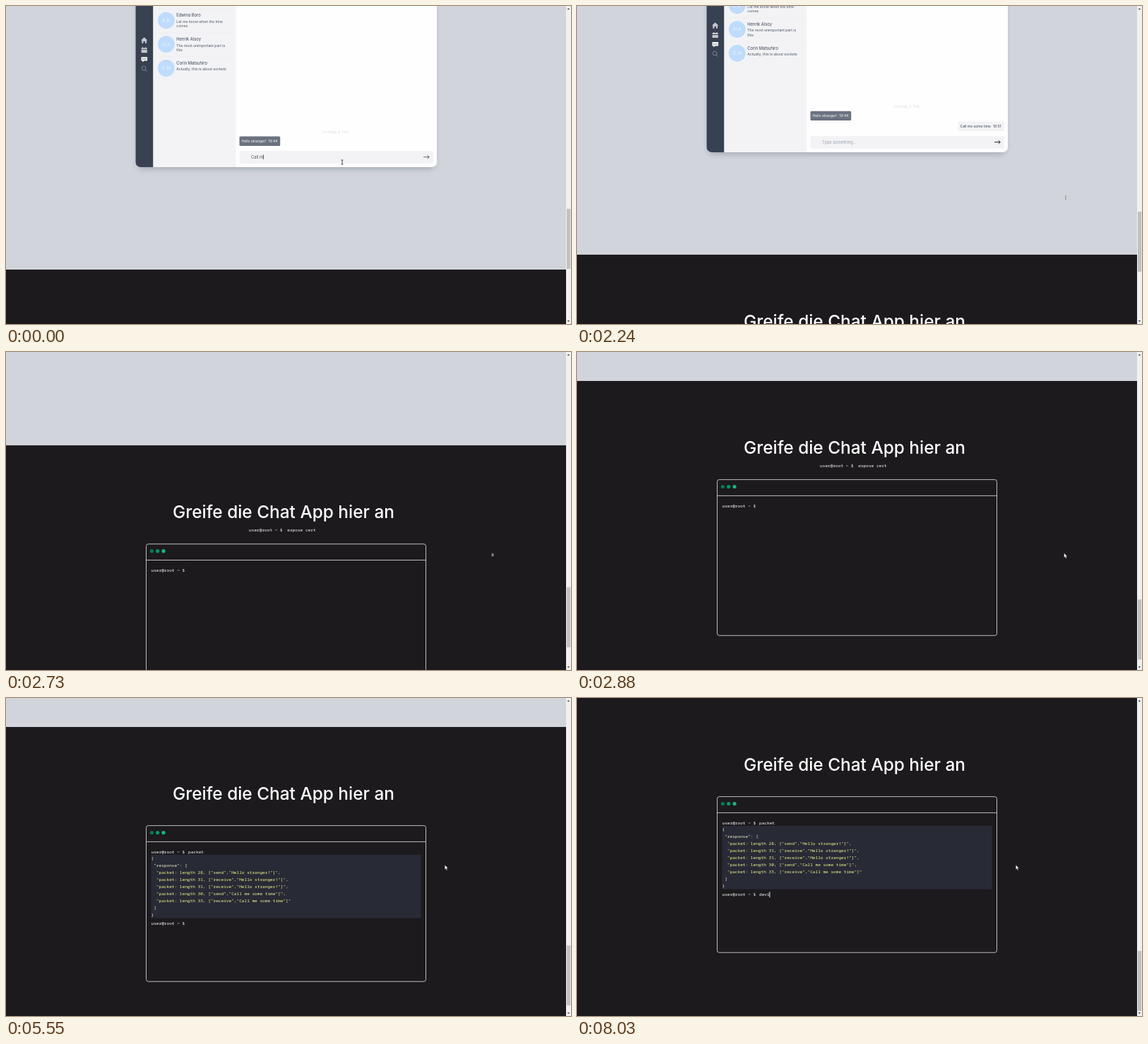
An HTML page that plays this animation: 800x450 px, repeating every 8.09 s.

```html
<!DOCTYPE html>
<html lang="de">
<head>
<meta charset="utf-8">
<title>Chat App</title>
<style>
  html, body { margin: 0; width: 100%; height: 100%; overflow: hidden; background: #d1d5db; }
  svg { display: block; width: 100vw; height: 100vh; }
  text { font-family: Inter, sans-serif; white-space: pre; }
  .mono { font: 500 6.11px "Noto Sans Mono", monospace; fill: #fff; }
</style>
</head>
<body>
<svg id="stage" viewBox="0 0 800 450">
  <defs>
    <filter id="soft" x="-10%" y="-10%" width="120%" height="125%"><feGaussianBlur stdDeviation="4"/></filter>
  </defs>
  <rect width="800" height="450" fill="#d1d5db"/>

  <g id="chat">
    <rect x="186" y="-300" width="421" height="531" rx="7" fill="#4b5563" opacity=".32" filter="url(#soft)"/>
    <rect x="183.5" y="-300" width="426.5" height="528" rx="7" fill="#fefefe"/>
    <path d="M183.5-300H208.5V228H190.5a7 7 0 0 1-7-7z" fill="#374151"/>
    <rect x="208.5" y="-300" width="117" height="528" fill="#f3f3f6"/>
    <g fill="#c3c7ce">
      <path d="M195.7 44.3l4.6 4.3h-1.2v4.2h-2.2v-2.7h-2.4v2.7h-2.2v-4.2h-1.2z"/>
      <path d="M191.6 59.2h1.4v-1h1.2v1h3v-1h1.2v1h1.4v2h-8.2zM191.6 62h8.2v4.2h-8.2z"/>
    </g>
    <path d="M191.5 72.2h8.6v5.4h-4.6l-2 2v-2h-2z" fill="#fff"/>
    <g fill="#374151"><circle cx="193.7" cy="75" r=".7"/><circle cx="195.8" cy="75" r=".7"/><circle cx="197.9" cy="75" r=".7"/></g>
    <g fill="none" stroke="#9ca3af" stroke-width=".7"><circle cx="195.1" cy="88.1" r="2.9"/><path d="M197.2 90.2l2.5 2.5"/></g>
    <g id="people"></g>
    <g id="log">
      <text x="467" y="180" text-anchor="middle" font-size="5" fill="#dcdde1">Sonntag, 6. Feb.</text>
      <rect x="330.5" y="184.5" width="57.7" height="13.4" rx="1.5" fill="#6b7280"/>
      <g font-size="5" fill="#fff"><text x="333.5" y="192.9">Hello stranger!</text><text x="371.5" y="192.9">19:44</text></g>
    </g>
    <g id="sent">
      <rect x="539.3" y="184.5" width="65.7" height="13.6" rx="1.5" fill="#f3f3f6"/>
      <g font-size="5" fill="#374151"><text x="542.5" y="193">Call me some time</text><text x="589" y="193">19:51</text></g>
    </g>
    <rect x="330.5" y="205" width="274.5" height="18" rx="3" fill="#f3f3f6"/>
    <text id="field" x="347" y="215.7" font-size="5.8"></text>
    <path id="fieldCaret" stroke="#222" stroke-width=".7"/>
    <path id="arrow" d="M591 213.7h8.3M596.6 211.2l2.7 2.5-2.7 2.5" fill="none" stroke-width=".9"/>
  </g>

  <g id="dark">
    <rect width="793" height="500" fill="#1c1a1d"/>
    <text x="393" y="103" text-anchor="middle" font-size="24.4" font-weight="500" fill="#fff">Greife die Chat App hier an</text>
    <g id="tag">
      <text id="tagUser" class="mono" y="121.9">user@root ~ $</text>
      <text id="tagWord" class="mono" y="121.9"></text>
      <path id="tagCaret" stroke="#fff" stroke-width=".9"/>
    </g>
    <g fill="none" stroke="#e5e5e8" stroke-width=".8">
      <rect x="198.5" y="139.6" width="396" height="220.6" rx="3"/>
      <path d="M198.5 162.4h396"/>
    </g>
    <circle cx="206.4" cy="149.6" r="2.6" fill="#047857"/>
    <circle cx="214.7" cy="149.6" r="2.6" fill="#059669"/>
    <circle cx="223" cy="149.6" r="2.6" fill="#10b981"/>
    <text class="mono" x="205.5" y="178.6">user@root ~ $</text>
    <text id="cmd1" class="mono" x="258" y="178.6"></text>
    <path id="caret1" stroke="#fff" stroke-width=".9"/>
    <g id="reply">
      <rect x="205.3" y="180.8" width="382.3" height="89.8" fill="#282a36"/>
      <g id="lines"></g>
      <text class="mono" x="205.5" y="280.4">user@root ~ $</text>
      <text id="cmd2" class="mono" x="258" y="280.4"></text>
      <path id="caret2" stroke="#fff" stroke-width=".9"/>
    </g>
  </g>

  <rect x="793" width="7" height="450" fill="#f1f1f1"/>
  <rect id="thumb" x="794" width="5.2" height="85" fill="#c1c1c1"/>
  <path d="M794.6 5l1.8-2 1.8 2zM794.6 445l1.8 2 1.8-2z" fill="#444"/>

  <g id="mouse">
    <path id="ibeam" d="M-1.4-3h2.8M0-3v6M-1.4 3h2.8" fill="none" stroke="#222" stroke-width=".8"/>
    <path id="pointer" d="M0 0v6.6l1.5-1.4 1.1 2.5 1-.4-1.1-2.5h2.1z" fill="#fff" stroke="#222" stroke-width=".4"/>
    <g id="pan" fill="#222" stroke="#fff" stroke-width=".5">
      <path id="panUp" d="M-1.5-1.5h3l-1.5-1.8z"/>
      <circle r="1"/>
      <path d="M-1.5 1.6h3l-1.5 1.8z"/>
    </g>
  </g>
</svg>
<script>
const LOOP = 8090, CH = 3.667;
const $ = id => document.getElementById(id);
const set = (id, name, value) => $(id).setAttribute(name, value);
const show = (id, on) => set(id, "visibility", on ? "visible" : "hidden");
const write = (id, s) => { if ($(id).textContent !== s) $(id).textContent = s; };
const span = (t, a, b) => Math.min(1, Math.max(0, (t - a) / (b - a)));
const ease = p => p * p * (3 - 2 * p);
const lerp = (a, b, p) => a + (b - a) * p;
const passed = (t, times) => times.filter(x => t >= x).length;
const shift = (id, x, y) => set(id, "transform", `translate(${x} ${y})`);

function caret(id, x, top, bottom, on) {
  set(id, "d", `M${x} ${top}V${bottom}`);
  show(id, on);
}

const label = (x, y, size, fill, s, more = "") =>
  `<text x="${x}" y="${y}" font-size="${size}" fill="${fill}" ${more}>${s}</text>`;

$("people").innerHTML = [
  ["Edwina Boro", "E B", "Let me know when the time", "comes"],
  ["Henrik Alsoy", "H A", "The most unimportant part is", "this"],
  ["Corin Matsuhiro", "C M", "Actually, this is about sockets", ""]
].map(([name, initials, a, b], i) => {
  const y = 20.4 + i * 33.8;
  return `<path d="M215 ${y - 16}H323" stroke="#ebebef" stroke-width=".6"/>
    <circle cx="226.8" cy="${y}" r="11.9" fill="#bfdbfe"/>` +
    label(226.8, y + 2.4, 6.6, "#eff6ff", initials, 'text-anchor="middle"') +
    label(241.3, y - 5.3, 5.8, "#374151", name) +
    label(241.3, y + 3.4, 5.05, "#4b5563", a) +
    label(241.3, y + 10, 5.05, "#4b5563", b);
}).join("");

const packet = (n, kind, msg, end = ",") => `  "packet: length ${n}, ["${kind}","${msg}"]"${end}`;
[
  "{", ' "response": [',
  packet(28, "send", "Hello stranger!"),
  packet(31, "receive", "Hello stranger!"),
  packet(31, "receive", "Hello stranger!"),
  packet(30, "send", "Call me some time"),
  packet(33, "receive", "Call me some time", ""),
  " ]", "}"
].forEach((s, i) => {
  const el = document.createElementNS("http://www.w3.org/2000/svg", "text");
  const indent = s.search(/\S/);
  el.setAttribute("class", "mono");
  el.setAttribute("x", 205.5 + indent * CH);
  el.setAttribute("y", 188 + i * 9.97);
  el.style.fill = i === 1 ? "#eef2c4" : s.includes("packet") ? "#f1fa8c" : "#f8f8f2";
  el.textContent = s.trim();
  $("lines").append(el);
});

function drawChat(t) {
  const sent = t >= 1300;
  const n = 6 + passed(t, [30, 130, 230, 330, 430, 530, 630, 730, 850, 940, 1030]);
  write("field", sent ? "Type something..." : "Call me some time".slice(0, n));
  set("field", "fill", sent ? "#9ca3af" : "#4b5563");
  const end = sent ? 347 : 347.4 + $("field").getComputedTextLength();
  caret("fieldCaret", end, 210.3, 217, t < 1830);
  set("arrow", "stroke", sent ? "#111" : "#555");
  shift("log", 0, sent ? -14.7 : 0);
  show("sent", sent);
}

function drawTag(t) {
  const cut = Math.floor(span(t, 3330, 3830) * 11);
  const word = t < 3900 ? "expose cert".slice(0, 11 - cut)
    : "help".slice(0, passed(t, [4000, 4100, 4200, 4300]));
  const x = 393 - (13 * CH + 9.8 + word.length * CH) / 2;
  const start = x + 13 * CH + 6.5;
  set("tagUser", "x", x);
  set("tagWord", "x", start);
  write("tagWord", word);
  const on = t < 5390;
  show("tag", on);
  caret("tagCaret", start + word.length * CH + 1.8, 116, 124, on && passed(t, [2700, 3200, 5120]) % 2 === 0);
}

function drawTerminal(t) {
  const a = passed(t, [4330, 4400, 4460, 4515, 4610, 4710]);
  write("cmd1", "packet".slice(0, a));
  caret("caret1", 258.2 + a * CH, 172.3, 180.4, passed(t, [3450, 3980, 4330, 5240]) % 2 === 1);
  const b = passed(t, [7790, 7850, 7930, 8000]);
  write("cmd2", "devi".slice(0, b));
  const open = t >= 5390;
  show("reply", open);
  caret("caret2", 258.2 + b * CH, 274.2, 282.2, open && passed(t, [6030, 6550, 7080, 7610, 7790]) % 2 === 1);
}

function drawMouse(t) {
  const go = ease(span(t, 1500, 1980)), drift = span(t, 2240, 2550), back = ease(span(t, 2970, 3360));
  let x = lerp(lerp(476, 692, go), 689, drift);
  let y = lerp(lerp(221, 271, go), 286, drift);
  const panning = t >= 1990 && t < 2852;
  if (t >= 2852) {
    x = lerp(689.7, 621.3, back);
    y = lerp(284.6, 236.2, back);
  }
  shift("mouse", x, y);
  show("ibeam", t < 1530);
  show("pointer", t >= 1530 && !panning);
  show("pan", panning);
  show("panUp", panning && t < 2300);
}

function draw(t) {
  // middle-click scrolling speeds up, then a short wheel scroll ends the page
  const glide = Math.min(332, (Math.max(0, t - 2035) * .0223) ** 2);
  const scroll = glide + 41 * ease(span(t, 6890, 7170));
  shift("chat", 0, -scroll);
  shift("dark", 0, 373 - scroll);
  set("thumb", "y", 287 + scroll * .19);
  drawChat(t);
  drawTag(t);
  drawTerminal(t);
  drawMouse(t);
}

const begin = performance.now();
function tick() {
  draw((performance.now() - begin) % LOOP);
  requestAnimationFrame(tick);
}
tick();
</script>
</body>
</html>
```
